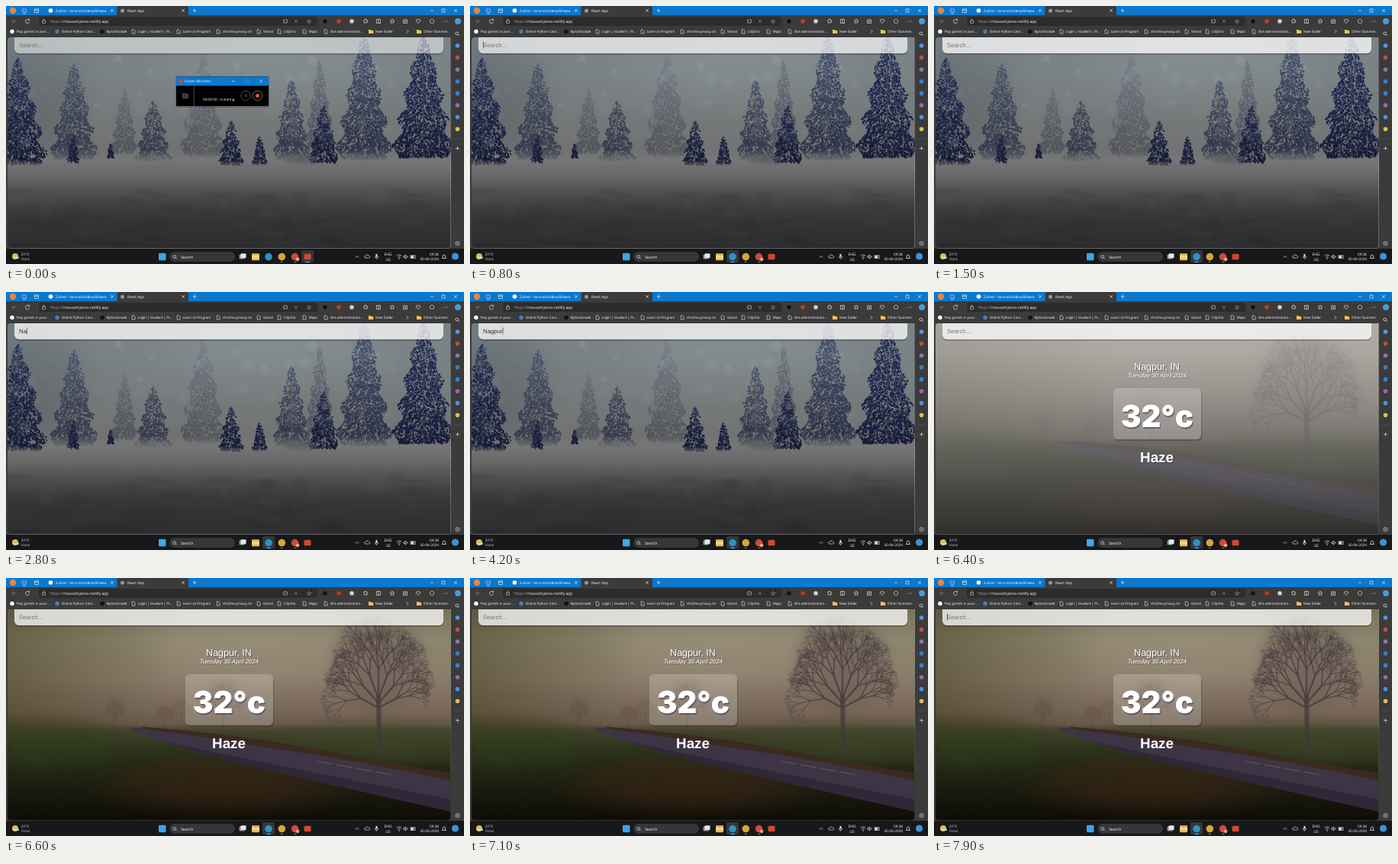
These frames come from a looping animation (600x338 px, 8000 ms). An HTML page with a canvas:

```html
<!DOCTYPE html>
<html lang="en">
<head>
<meta charset="utf-8">
<title>Weather search</title>
<style>
html, body { margin: 0; width: 100%; height: 100%; overflow: hidden; background: #3b3b3b; }
canvas, svg, div { position: absolute; left: 0; top: 0; }
svg { width: 600px; height: 338px; font-family: "Open Sans", "Noto Sans", sans-serif; text-rendering: geometricPrecision; }
#bar { left: 11px; top: 41px; width: 562px; height: 20.5px; border-radius: 0 0 6px 6px; box-shadow: 0 2px rgba(0,0,0,.2); }
#box { left: 235px; top: 126px; width: 115px; height: 67px; border-radius: 6px; background: rgba(255,255,255,.2); box-shadow: 1.2px 2.3px rgba(0,0,0,.2); }
.app { font-family: "Liberation Sans", Arial, sans-serif; }
.heavy { font-family: Inter, "Liberation Sans", sans-serif; font-weight: 900; }
</style>
</head>
<body>
<canvas id="view" width="600" height="338"></canvas>
<div id="bar"></div>
<div id="box"></div>
<svg id="ui" viewBox="0 0 600 338"></svg>
<script>
const $ = id => document.getElementById(id);
const clamp = v => Math.max(0, Math.min(1, v));
const rng = seed => () => (seed = seed * 16807 % 2147483647) / 2147483647;
const mix = (a, b, k) => `rgb(${a.map((v, i) => Math.round(v + (b[i] - v) * k))})`;

// ---- page backdrops ----
function scene(paint) {
  const canvas = document.createElement('canvas');
  canvas.width = 600;
  canvas.height = 338;
  const g = canvas.getContext('2d');
  g.beginPath();
  g.roundRect(2, 41, 580.5, 276.5, [4, 0, 4, 4]);
  g.clip();
  paint(g);
  return canvas;
}

function fade(g, y0, y1, stops, horizontal) {
  const f = horizontal ? g.createLinearGradient(y0, 0, y1, 0) : g.createLinearGradient(0, y0, 0, y1);
  stops.forEach(([p, c]) => f.addColorStop(p, c));
  return f;
}

function wash(g, y0, y1, ...stops) {
  g.fillStyle = fade(g, y0, y1, stops);
  g.fillRect(0, y0, 600, 338 - y0);
}

function glow(g, x, y, rx, ry, rgb, alpha) {
  g.save();
  g.translate(x, y);
  g.scale(rx, ry);
  const f = g.createRadialGradient(0, 0, 0, 0, 0, 1);
  f.addColorStop(0, `rgba(${rgb},${alpha})`);
  f.addColorStop(.55, `rgba(${rgb},${alpha * .7})`);
  f.addColorStop(1, `rgba(${rgb},0)`);
  g.fillStyle = f;
  g.fillRect(-1, -1, 2, 2);
  g.restore();
}

function stroke(g, x0, y0, x1, y1, width, color) {
  g.strokeStyle = color;
  g.lineWidth = width;
  g.beginPath();
  g.moveTo(x0, y0);
  g.lineTo(x1, y1);
  g.stroke();
}

const shade = g => wash(g, 41, 318, [0, 'rgba(0,0,0,.2)'], [1, 'rgba(0,0,0,.75)']);

const blank = scene(g => {
  wash(g, 41, 318, [0, '#fff'], [1, '#fff']);
  shade(g);
});

const snow = scene(g => {
  const r = rng(77);
  const fir = ([x, top, base, half, depth]) => {
    const fog = [178, 186, 190], navy = [34, 46, 108];
    const dark = mix(fog, navy, depth), light = mix(fog, navy, depth * .6);
    stroke(g, x, top, x, base, 1, dark);
    const count = half * (base - top) * .36 + 40;
    for (let i = 0; i < count; i++) {
      const f = r() ** .6;
      const dx = (2 * r() - 1) * half * f ** .7 * (.86 + .14 * Math.sin(f * 30));
      const y = top + f * (base - top), s = Math.sign(dx);
      stroke(g, x + dx, y, x + dx + s * (.8 + f), y + 1 + 1.6 * f, 1 + .8 * r(), r() < .14 ? light : dark);
    }
  };
  // x, top, base, half width, depth of colour
  const firs = [
    [258, 60, 195, 31, .15], [155, 107, 192, 18, .18], [411, 73, 185, 20, .24],
    [89, 75, 200, 33, .55], [193, 123, 207, 26, .55], [374, 97, 200, 26, .55], [469, 38, 200, 39, .66],
    [16, 68, 206, 40, .96], [88, 168, 204, 8, .92], [137, 180, 197, 4, .92], [295, 150, 207, 17, .96],
    [332, 171, 206, 10, .94], [416, 130, 204, 21, .96], [547, 40, 197, 43, .96]
  ];
  wash(g, 41, 210, [0, '#98a5ab'], [.3, '#adb8bc'], [.65, '#c8cdcf'], [1, '#eae8ea']);
  glow(g, 0, 105, 130, 110, '110,122,132', .4);
  glow(g, 350, 95, 190, 60, '205,220,225', .35);
  firs.filter(f => f[4] < .9).forEach(fir);
  wash(g, 188, 318, [0, 'rgba(248,246,248,0)'], [.13, '#faf8fa'], [.27, '#ebe9eb'], [.42, '#cdcbcd'],
    [.57, '#acabae'], [.75, '#9fa1a5'], [1, '#aeb0b5']);
  firs.filter(f => f[4] > .9).forEach(fir);
  glow(g, 386, 202, 28, 9, '180,180,186', .7);
  for (let x = 0; x < 600; x += 24) glow(g, x, 208 + r() * 4, 38, 7, '240,238,240', .4);
  for (let i = 0; i < 60; i++) {
    const size = 3 + r() * 8;
    glow(g, r() * 583, 65 + r() * 125, size, size, '235,244,248', .06 + r() * .2);
  }
  for (let i = 0; i < 50; i++) glow(g, r() * 583, 240 + r() * 75, 8 + r() * 28, 4 + r() * 7, r() < .45 ? '220,220,226' : '110,112,118', .2);
  shade(g);
});

const haze = scene(g => {
  const r = rng(41);
  const twig = (x, y, angle, len, width, left, color) => {
    const nx = x + Math.sin(angle) * len, ny = y - Math.cos(angle) * len;
    stroke(g, x, y, nx, ny, width, color);
    if (!left) return;
    for (let i = -1; i < 2; i++)
      twig(nx, ny, angle + i * .5 + (r() - .5) * .5, len * (.62 + r() * .14), width * .65, left - 1, color);
  };
  const bareTree = (x, base, height, depth, rgb, alpha) => {
    const u = height / 183, color = `rgba(${rgb},${alpha})`;
    glow(g, x - 2 * u, base - 118 * u, 74 * u, 74 * u, rgb, alpha * .5);
    stroke(g, x, base, x - u, base - 75 * u, 6 * u, color);
    for (let i = -3; i < 4; i++) {
      const a = i * .36;
      twig(x - u, base - (58 + 6 * (3 - Math.abs(i))) * u, a, (20 + 13 * Math.cos(a)) * u, 2.4 * u, depth, color);
    }
  };
  const shape = (color, path) => {
    g.fillStyle = color;
    g.fill(new Path2D(path));
  };
  wash(g, 41, 205, [0, '#797558'], [.25, '#8d8570'], [.55, '#8b7c6a'], [.8, '#796859'], [1, '#5d5140']);
  g.fillStyle = fade(g, 0, 220, [[0, 'rgba(50,48,18,.4)'], [1, 'rgba(50,48,18,0)']], true);
  g.fillRect(0, 41, 220, 160);
  glow(g, 330, 90, 170, 60, '165,152,132', .35);
  bareTree(143, 196, 41, 3, '85,68,58', .35);
  bareTree(208, 196, 34, 3, '85,68,58', .3);
  bareTree(230, 197, 44, 3, '90,72,62', .22);
  bareTree(284, 204, 76, 3, '85,65,58', .42);
  wash(g, 192, 318, [0, 'rgba(70,66,44,0)'], [.06, '#45432d'], [.25, '#2c331b'], [.6, '#1d1f10'], [1, '#0e0c07']);
  glow(g, 500, 215, 200, 35, '64,72,42', .6);
  glow(g, 40, 215, 150, 40, '48,60,28', .6);
  glow(g, 290, 270, 190, 45, '62,38,22', .65);
  shape('#3b2a1f', 'M178 195 Q300 204 400 223 T583 256 V272 Q380 232 178 198Z');
  shape('#3d3545', 'M160 196 Q176 195 194 199 Q300 215 400 231 T583 266 V306 L400 265 L290 239 Q205 216 160 196Z');
  shape('rgba(28,22,36,.4)', 'M205 214 Q400 255 583 290 V306 L400 265 L290 239Z');
  g.setLineDash([20, 6]);
  stroke(g, 408, 240, 512, 259, .8, 'rgba(150,118,60,.7)');
  g.setLineDash([]);
  for (let i = 0; i < 420; i++) {
    const x = r() * 583, y = Math.max(205, 206 + (x - 170) * .27) + r() * 110;
    stroke(g, x, y, x + 2, y - 1, 1, r() < .5 ? 'rgba(75,50,30,.3)' : 'rgba(8,8,4,.35)');
  }
  bareTree(489, 228, 183, 5, '68,54,60', .7);
});

// ---- interface ----
const txt = (x, y, s, size = 4.7, more = '') => `<text x="${x}" y="${y}" font-size="${size}" ${more}>${s}</text>`;
const dot = (x, y, r, c) => `<circle cx="${x}" cy="${y}" r="${r}" fill="${c}"/>`;
const rect = (x, y, w, h, c, r = 0, more = '') => `<rect x="${x}" y="${y}" width="${w}" height="${h}" rx="${r}" fill="${c}" ${more}/>`;
const line = (d, c = '#ddd', w = .7) => `<path d="${d}" fill="none" stroke="${c}" stroke-width="${w}"/>`;
const cross = (x, y, s = 1.8) => line(`M${x - s} ${y - s}l${2 * s} ${2 * s}m0 ${-2 * s}l${-2 * s} ${2 * s}`, '#fff', .6);
const plus = (x, y, s = 2.3) => line(`M${x - s} ${y}h${2 * s}M${x} ${y - s}v${2 * s}`, '#fff', .6);
const lens = (x, y) => line(`M${x + 1.3} ${y + 1.3}l1.6 1.6M${x + 1.6} ${y}a1.9 1.9 0 1 0 -3.8 0a1.9 1.9 0 1 0 3.8 0`, '#eee');
const folder = (x, y, c = '#f3c65a') => `<path d="M${x - 3} ${y - 2.4}h2.3l.8 .8h3v4h-6.1z" fill="${c}"/>`;
const page = (x, y) => line(`M${x - 1.8} ${y - 2.6}h2.4l1.4 1.4v3.8h-3.8z`, '#eee', .6);
const frameIcon = (x, y) => line(`M${x - 2.3} ${y - 2}h4.6v4h-4.6z`, '#ddd', .6);
const ring = (x, y, r, c) => `<circle cx="${x}" cy="${y}" r="${r}" fill="none" stroke="${c}" stroke-width=".6"/>`;

const tabs = () =>
  rect(0, 0, 600, 12, '#0b78cf') + dot(9, 6, 4.2, '#d98a4c') +
  frameIcon(24, 6) + line('M22 10h4M37.5 3.8h5v4.8h-5zM37.5 5.4h5', '#fff', .6) +
  dot(58.5, 6, 2.8, '#fff') + txt(65, 8, 'Zubrel - tarunvashdeva38/wea') + cross(139, 6) +
  rect(145.5, 0, 93.5, 13, '#3b3b3b', 1.5) + dot(152.5, 6.3, 2.5, '#8d9aa0') + txt(159, 8, 'React App') + cross(232, 6) + plus(247, 6) +
  line('M556 6h4M571 4h4v4h-4z', '#fff', .6) + cross(589, 6, 2);

const toolbar = () =>
  rect(0, 12, 600, 29, '#3b3b3b') + rect(43, 14, 365, 12, '#2c2c2c', 4) +
  line('M14 20h-6m2.4-2.4l-2.4 2.4l2.4 2.4', '#888') + line('M30.4 18.4a2.7 2.7 0 1 0 .4 2.6M30.7 16.8v2h-2') +
  line('M47.5 19.5h4v3h-4zM48.3 19.5v-1a1.2 1.2 0 0 1 2.4 0v1', '#ccc', .6) +
  txt(58, 22, '<tspan fill="#aaa">https://</tspan>mausamjanoo.netlify.app', 5) +
  frameIcon(366, 20) + txt(378, 22, 'A', 5.5, 'fill="#aaa"') + line('M397 17.6l.8 1.6l1.8 .2l-1.3 1.2l.3 1.8l-1.6-.9l-1.6 .9l.3-1.8l-1.3-1.2l1.8-.2z', '#aaa', .6) +
  rect(415.5, 17.5, 5, 5, '#111', 1) + dot(436, 20, 2.8, '#c3372b') + dot(453, 20, 2.8, '#d8d0c4') +
  line('M469 18h4v4h-4zM471 16.7v1.3M473 20h1.3') + line('M485.5 17.5h5v5h-5zM488 17.5v5') +
  line('M506 17l.9 1.9l2 .2l-1.5 1.3l.4 2l-1.8-1l-1.8 1l.4-2l-1.5-1.3l2-.2z') +
  line('M520.5 18h5v4.5h-5zM523 19v2.5M521.8 20.2h2.4') + line('M537.5 20l2.5 2.6l2.5-2.6a1.4 1.4 0 0 0 -2.5-1.6a1.4 1.4 0 0 0 -2.5 1.6') +
  ring(558, 20, 2.7, '#ddd') + [574, 576, 578].map(x => dot(x, 20, .5, '#ddd')).join('') + dot(592, 20, 4, '#3f9fd8');

const bookmarks = () => [
  [8, 'Play games in your...', '#fff'], [67, 'Online Python Com…', '#4a7fb0'], [126, 'BytomGrade', '#111'],
  [167, 'Login | Student | Pi…'], [226, 'Learn to Program'], [278, 'chrome.privacy.st/'], [331, 'Vomal'],
  [358, 'ClipOro'], [391, 'Maps'], [419, 'Site administration…']
].map(([x, s, c]) => (c ? dot(x, 33.5, 2.7, c) : page(x, 33.5)) + txt(x + 5.7, 35.3, s, 4.5)).join('') +
  folder(478, 33.5) + txt(484, 35.3, 'New folder', 4.5) + line('M525 31.5l2 2l-2 2', '#fff') +
  folder(541, 33.5) + txt(547, 35.3, 'Other favorites', 4.5);

const sidebar = () =>
  rect(583, 28, 17, 290, '#3b3b3b') + lens(591, 36) +
  ['#4c9be8', '#b8543f', '#8a78a8', '#3f7fc0', '#2f86d6', '#a862b8', '#4594e0', '#d8c05a']
    .map((c, i) => dot(591.5, 52 + i * 15.6, 2.8, c)).join('') +
  line('M587 174h9', '#666', .5) + plus(591.5, 186.5) + ring(591.5, 311, 2.7, '#ddd') + ring(591.5, 311, .9, '#ddd');

const taskbar = () =>
  rect(0, 318, 600, 20, '#17181a') + dot(12, 328, 4, '#e2b94d') + rect(9, 328.5, 8, 2.6, '#cfd3d6', 1.3) +
  txt(20, 326.6, '31°C', 4.8) + txt(20, 333.2, 'Haze', 4.8, 'fill="#bbb"') +
  rect(200, 323.8, 9.5, 9.5, '#3aa7ec', 1) + rect(214, 322, 86, 13, '#343638', 6.5) + lens(221, 328.5) + txt(229, 330.5, 'Search', 5.2) +
  `<g id="edgeOn">${rect(336, 320, 16, 16, '#34363a', 2)}${rect(341, 335, 6, 1, '#5ab8f0', .5)}</g>` +
  `<g id="recOn">${rect(387, 320, 16, 16, '#34363a', 2)}${rect(392, 335, 6, 1, '#5ab8f0', .5)}</g>` +
  rect(305.5, 325.5, 7, 6, '#8c8f93', 1) + rect(307.5, 324.3, 7, 6, '#e4e6e8', 1) +
  rect(322, 324.3, 10, 9, '#e8bc54', 1) + rect(322, 327.3, 10, 3, '#f2d88c') +
  dot(344, 328.6, 4.8, '#2f93bf') + dot(361.3, 328.6, 4.8, '#d9a53a') + dot(378.5, 328.6, 4.8, '#cc4a3c') + dot(382, 331.8, 2.4, '#e6a08e') +
  rect(390.5, 324.8, 9, 7.5, '#d2472f', 1.5) +
  [361, 379].map(x => rect(x - 1.5, 335, 3, 1, '#8a8d90', .5)).join('') +
  line('M458 329.5l2-2l2 2', '#fff') + line('M470.5 330h5a1.4 1.4 0 0 0 -.3-2.8a2.3 2.3 0 0 0 -4.2 .4a1.2 1.2 0 0 0 -.5 2.4z') +
  rect(484.3, 324.8, 2.2, 4.4, '#ddd', 1.1) + line('M483 328a2.4 2.4 0 0 0 4.8 0M485.4 330.4v1.4') +
  txt(500.5, 327, 'ENG', 4.9, 'text-anchor="middle"') + txt(500.5, 333.5, 'US', 4.9, 'text-anchor="middle"') +
  line('M512 327.4a4.2 4.2 0 0 1 6 0M513.4 329.2a2.3 2.3 0 0 1 3.2 0', '#fff') + dot(515, 331, .7, '#fff') +
  line('M521 327.4h1.2l1.6-1.4v5l-1.6-1.4h-1.2z', '#fff') + cross(525.6, 328.5, .9) +
  line('M530 326.8h6v3.6h-6z', '#fff') + rect(530.6, 327.4, 3.4, 2.4, '#fff') +
  txt(567, 326.8, '09:38', 4.7, 'text-anchor="end"') + txt(567, 333.3, '30-04-2024', 4.7, 'text-anchor="end"') +
  line('M571.5 330.5h5l-.8-1.4v-1.4a1.7 1.7 0 0 0 -3.4 0v1.4z', '#fff') + dot(588.5, 328, 4.6, '#3c94d6');

const recorder = () => `<g id="recorder">` +
  rect(222, 92, 123, 41, 'rgba(0,0,0,.2)', 2) + rect(223, 92.5, 121, 38.5, '#000', 1.5) + rect(223, 92.5, 121, 12, '#0b78cf', 1.5) +
  dot(229, 98.5, 2.6, '#d2472f') + txt(233.5, 100.4, 'Screen Recorder', 4.6) +
  line('M296 98.5h4', '#fff', .6) + line('M314.3 96.8h3.4v3.4h-3.4z', '#4b9bdb', .6) + cross(334, 98.5) +
  line('M246.3 105v26', '#777', .6) + line('M232 115h2l.8 .9h3.2v4.4h-6zM235 117v2M234 118h2', '#ddd', .6) +
  txt(258, 124, '00:00:00 : Initiating', 4.7) +
  ring(314, 117.5, 6.3, '#777') + line('M313 115.7v3.6M315 115.7v3.6', '#777') +
  ring(329.5, 117.5, 6.3, '#aaa') + rect(327.2, 115.2, 4.6, 4.6, '#e8523f', .6) + '</g>';

const shadowed = (x, y, s, size, dx, dy, more) => {
  const put = (ox, oy, fill) => txt(x + ox, y + oy, s, size, `text-anchor="middle" ${more} fill="${fill}"`);
  return put(dx, dy, 'rgba(50,50,70,.5)') + put(0, 0, '#fff');
};

const weather = () => '<g id="weather">' +
  shadowed(292, 102, 'Nagpur, IN', 12.5, 1.2, 1.2, 'class="app"') +
  shadowed(292.3, 112, 'Tuesday 30 April 2024', 7.8, .8, .8, 'class="app" font-style="italic"') +
  shadowed(292.3, 176.5, '32°c', 40, 1.2, 2.3, 'class="heavy"') +
  shadowed(292, 222.5, 'Haze', 18.75, 1.2, 1.2, 'class="app" font-weight="700"') + '</g>';

$('ui').innerHTML = '<g fill="#fff">' + tabs() + toolbar() + bookmarks() + sidebar() + taskbar() + weather() + '</g>' +
  txt(17, 53.8, '', 7.8, 'id="query" class="app"') + rect(17, 46.5, .6, 9, '#222', 0, 'id="caret"') +
  `<g fill="#fff">${recorder()}</g>`;

// ---- playback ----
const view = $('view').getContext('2d');
const city = 'Nagpur', typeAt = 2100, keyGap = 360, enterAt = 4600, resultAt = 4700;
const show = (id, on) => $(id).style.display = on ? '' : 'none';

function frame(now) {
  const t = now % 8000;
  view.clearRect(0, 0, 600, 338);
  view.drawImage(t < resultAt ? snow : blank, 0, 0);
  view.globalAlpha = clamp((t - 6300) / 300);
  view.drawImage(haze, 0, 0);
  view.globalAlpha = 1;

  $('bar').style.background = `rgba(255,255,255,${.5 + .25 * clamp((t - 500) / 400)})`;
  const typing = t >= typeAt && t < enterAt;
  const typed = typing ? city.slice(0, Math.floor((t - typeAt) / keyGap) + 1) : '';
  $('query').textContent = typed || 'Search...';
  $('query').setAttribute('fill', typed ? '#313131' : '#757575');
  $('caret').setAttribute('x', typed ? 17.2 + $('query').getComputedTextLength() : 17);
  show('caret', typing || t > 605 && (t - 605) % 1000 < 490);

  show('weather', t >= resultAt);
  show('box', t >= resultAt);
  const away = clamp((t - 200) / 200);
  $('recorder').setAttribute('opacity', 1 - away);
  show('recOn', away < 1);
  show('edgeOn', away === 1);
  requestAnimationFrame(frame);
}
requestAnimationFrame(frame);
</script>
</body>
</html>
```
